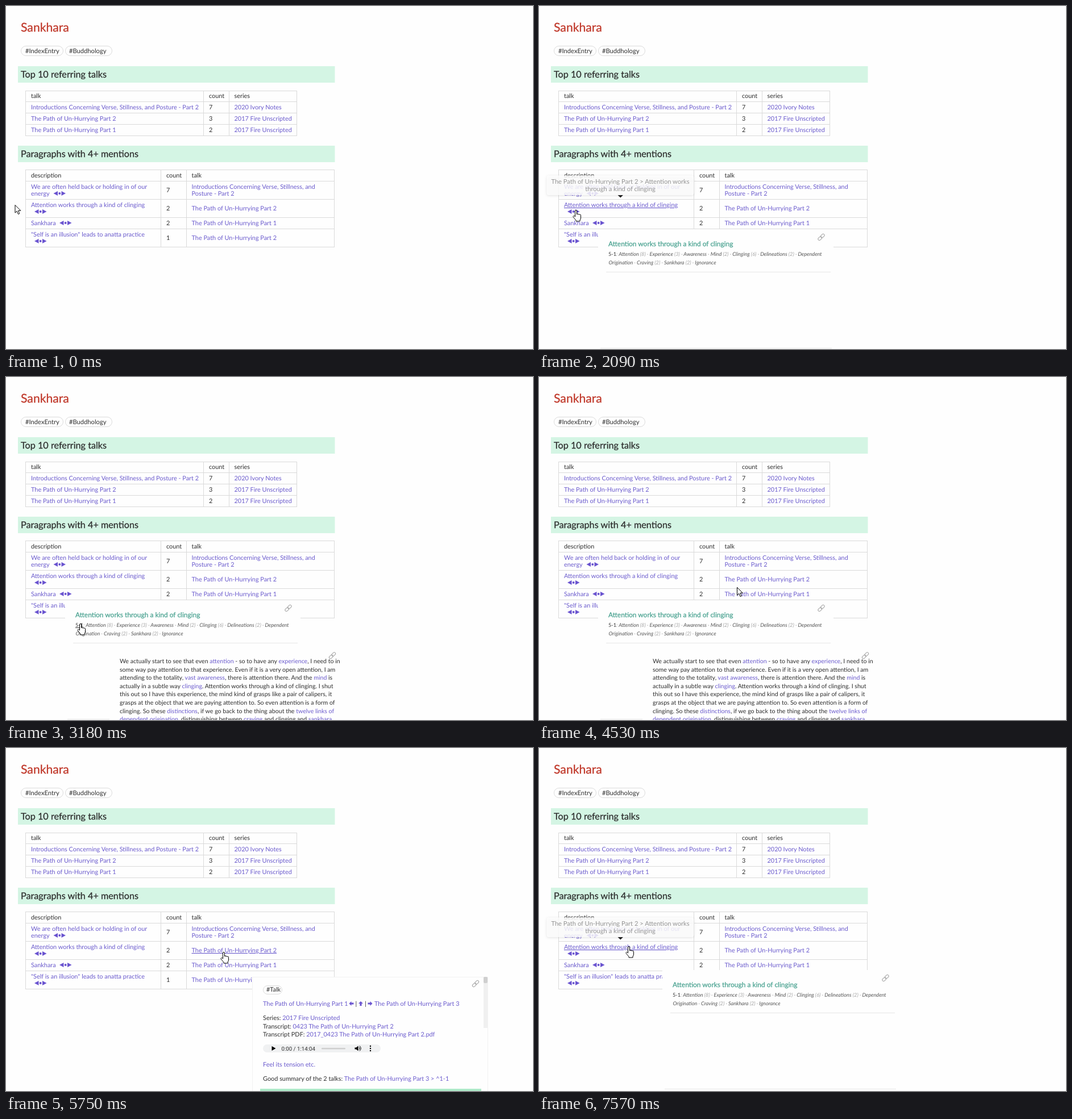
Recreate the animation shown at these times as an HTML page. Size 927 by 604 pixels, loop 8 s.

```html
<!DOCTYPE html>
<html lang="en">
<head>
<meta charset="utf-8">
<title>Sankhara</title>
<style>
html, body { margin: 0; width: 100%; height: 100%; overflow: hidden; background: #fefefe; }
svg { display: block; width: 927px; height: 604px; }
text { font-family: Lato, "Open Sans", sans-serif; font-size: 10.9px; fill: #2e2e2e; text-rendering: geometricPrecision; }
.link { fill: #6a5acd; }
.under { text-decoration: underline; }
.dim { fill: #a4a4a4; }
.title { font-size: 21.2px; fill: #c0392b; stroke: #c0392b; stroke-width: .3; }
.head { font-size: 16.2px; stroke: #2e2e2e; stroke-width: .25; }
.topic { font-size: 11.95px; fill: #46a08e; stroke: #46a08e; stroke-width: .25; }
.tag { font-size: 11.2px; }
.grid { fill: none; stroke: #dadada; }
.pill { fill: #fefefe; stroke: #dcdcdc; }
.mark { fill: #6a54d0; }
.rule { stroke: #e6e6e6; }
.chain { fill: none; stroke: #a6a6a6; }
.body text { font-size: 10.6px; }
.topics text { font-size: 9.17px; font-style: italic; fill: #555; }
.cursor { fill: #fff; stroke: #000; stroke-linejoin: round; }
</style>
</head>
<body>
<svg id="stage" viewBox="0 0 927 604"></svg>
<script>
const LOOP = 8000;
const path = n => `The Path of Un-Hurrying Part ${n}`;
const intro = ["Introductions Concerning Verse, Stillness, and", "Posture - Part 2"];
const series = "2017 Fire Unscripted";
const topic = "Attention works through a kind of clinging";

const text = (x, y, s, attrs = "") => `<text x="${x}" y="${y}" ${attrs}>${s}</text>`;
const link = (x, y, s, attrs = "") => text(x, y, s, `class="link" ${attrs}`);
const a = s => `<tspan class="link">${s}</tspan>`;
const rect = (x, y, w, h, attrs) => `<rect x="${x}" y="${y}" width="${w}" height="${h}" ${attrs}/>`;
const group = (id, s, attrs = "") => `<g id="${id}" ${attrs}>${s}</g>`;
const rule = (x1, x2, y) => `<path class="rule" d="M${x1} ${y}H${x2}"/>`;
const pill = (x, y, w, h) => rect(x + .5, y + .5, w, h, `rx="${h / 2}" class="pill"`);

// Table lines at the given columns and rows
function grid(xs, ys) {
  const [l, r, t, b] = [xs[0], xs.at(-1), ys[0], ys.at(-1)];
  const d = xs.map(x => `M${x + .5} ${t}V${b + 1}`).join("") + ys.map(y => `M${l} ${y + .5}H${r + 1}`).join("");
  return `<path class="grid" d="${d}"/>`;
}

// Back, dot and forward marks
const marks = (x, y) => `<path class="mark" d="M${x} ${y}l7.5-4v8zM${x + 21.5} ${y}l-7.5-4v8z"/>
  <circle class="mark" cx="${x + 10.7}" cy="${y}" r="2"/>`;

const chain = (x, y) => `<g class="chain" transform="translate(${x} ${y}) rotate(-45)">
  <rect x="-7" y="-2.3" width="7.6" height="4.6" rx="2.3"/><rect x="-.6" y="-2.3" width="7.6" height="4.6" rx="2.3"/></g>`;

const band = (y, s) => rect(21, y, 557.5, 29, 'fill="#d4f5e4"') + text(26, y + 20, s, 'class="head"');

function page() {
  return text(26, 44.5, "Sankhara", 'class="title"') +
    pill(26, 70, 74, 17) + text(34, 83, "#IndexEntry", 'class="tag"') +
    pill(104, 70, 82, 17) + text(111, 83, "#Buddhology", 'class="tag"') +
    band(106, "Top 10 referring talks") +
    grid([34, 347, 392, 511], [149, 168, 188, 208, 228]) +
    text(44, 162, "talk") + text(357, 162, "count") + text(401.5, 162, "series") +
    link(44, 182, intro.join(" ")) + text(357, 182, 7) + link(401.5, 182, "2020 Ivory Notes") +
    link(44, 202, path(2)) + text(357, 202, 3) + link(401.5, 202, series) +
    link(44, 222, path(1)) + text(357, 222, 2) + link(401.5, 222, series) +
    band(246, "Paragraphs with 4+ mentions") +
    grid([34, 272, 317, 577], [288, 308, 340, 372, 392, 424]) +
    text(44, 302, "description") + text(282, 302, "count") + text(326.5, 302, "talk") +
    link(44, 322, "We are often held back or holding in of our") + link(44, 334, "energy") + marks(83.5, 330) +
    text(282, 328, 7) + link(326.5, 322, intro[0]) + link(326.5, 334, intro[1]) +
    link(44, 354, topic, 'id="topicLink"') + marks(50, 362) + text(282, 360, 2) + link(326.5, 360, path(2), 'id="talkLink"') +
    link(44, 386, "Sankhara") + marks(94, 382) + text(282, 386, 2) + link(326.5, 386, path(1)) +
    link(44, 406, '"Self is an illusion" leads to anatta practice') + marks(50, 414) + text(282, 412, 1) + link(326.5, 412, path(2));
}

function topicPanel() {
  const n = k => `<tspan class="dim">(${k})</tspan>`;
  const dot = ' <tspan class="dim">·</tspan> ';
  const first = ["Attention " + n(8), "Experience " + n(3), "Awareness", "Mind " + n(2), "Clinging " + n(6), "Delineations " + n(2), "Dependent"];
  const second = ["Origination", "Craving " + n(2), "Sankhara " + n(2), "Ignorance"];
  const ref = '<tspan id="ref" style="font-style:normal;fill:#333">5-1</tspan><tspan class="dim">:</tspan> ';
  return rect(104, 393, 414, 211, 'fill="#fefefe"') + chain(496.5, 407) + rule(108, 515, 602.5) +
    group("topicText",
      text(122, 422.5, topic, 'class="topic"') + group("topicChain", chain(354, 415.5)) +
      group("topics", text(122, 440, ref + first.join(dot)) + text(122.5, 455, second.join(dot)), 'class="topics"') +
      rule(118, 513, 468.5));
}

function bodyPanel() {
  const lines = [
    `We actually start to see that even ${a("attention")} - so to have any ${a("experience")}, I need to in`,
    "some way pay attention to that experience. Even if it is a very open attention, I am",
    `attending to the totality, ${a("vast awareness")}, there is attention there. And the ${a("mind")} is`,
    `actually in a subtle way ${a("clinging")}. Attention works through a kind of clinging. I shut`,
    "this out so I have this experience, the mind kind of grasps like a pair of calipers, it",
    "grasps at the object that we are paying attention to. So even attention is a form of",
    `clinging. So these ${a("distinctions")}, if we go back to the thing about the ${a("twelve links of")}`,
    `${a("dependent origination")}, distinguishing between ${a("craving")} and clinging and ${a("sankhara")}`];
  return rect(182, 476, 420, 128, 'fill="#fefefe"') + chain(574, 490.5) +
    lines.map((s, i) => text(200, 504 + i * 14.6, s)).join("");
}

function player() {
  return rect(452, 522, 207, 14, 'rx="7" fill="#f0f1f2"') +
    '<path d="M467.5 525v8l7-4zM613.5 527.5h2.5l3.5-3v9l-3.5-3h-2.5z"/>' +
    '<path d="M621 526.5q2.2 2.5 0 5M622 524.5q4.5 4.5 0 9" fill="none" stroke="#000"/>' +
    rect(555, 528, 42, 2.4, 'rx="1.2" fill="#cfcfcf"') +
    [525, 529, 533].map(y => `<circle cx="641" cy="${y}" r="1.2"/>`).join("") +
    text(484.5, 532.5, "", 'id="clock" style="font-family:Roboto,sans-serif;font-size:9.7px"');
}

function talkPanel() {
  const arrow = (x, turn) => `<path class="mark" transform="translate(${x} 450) rotate(${turn})" d="M-4 0L0-4V-1.6H4V1.6H0V4z"/>`;
  return rect(433.5, 403.5, 414, 210, 'fill="#fefefe" stroke="#f2f2f2"') + chain(826, 415) +
    group("talkText",
      pill(452, 418, 33, 15) + text(458, 429, "#Talk") +
      link(452, 454, path(1)) + arrow(607.5, 0) + text(614.5, 454, "|") + arrow(624, 90) + text(631, 454, "|") +
      arrow(640.5, 180) + link(648, 454, path(3)) +
      text(452, 479, "Series: " + a(series)) +
      text(452, 494, "Transcript: " + a("0423 " + path(2))) +
      text(452, 508, "Transcript PDF: " + a(`2017_0423 ${path(2)}.pdf`)) + player() +
      link(452, 561, "Feel its tension etc.") +
      text(452, 586, "Good summary of the 2 talks: " + a(path(3) + " &gt; ^1-1")) +
      rect(447, 600, 389, 4, 'fill="#aeeac9"') +
      rect(840, 403, 7, 90, 'id="thumb"') + rect(840, 403, 7, 11, 'rx="2" fill="#cfcfcf"'));
}

function tooltip() {
  const style = 'text-anchor="middle" style="font-size:11.15px;fill:#949494"';
  return rect(13.5, 298.5, 259, 34.5, 'rx="4" fill="#fefefe" fill-opacity=".84" style="filter:drop-shadow(0 1px 2px #0002)"') +
    text(143, 313, path(2) + " &gt; Attention works", style) +
    text(143, 326, "through a kind of clinging", style) +
    '<path d="M138.5 333h9.5l-4.7 4.5z" fill="#222"/>';
}

const shapes = {
  arrow: '<path class="cursor" d="M.5.5V14.2L3.7 11.2L6 16.6L8.3 15.6L6 10.3H10.3Z"/>',
  hand: '<path class="cursor" d="M4.5 12V2a1.5 1.5 0 0 1 3 0V8a1.3 1.3 0 0 1 2.6.3a1.2 1.2 0 0 1 2.3.5a1.1 1.1 0 0 1 2.1.6V14q0 2-1.5 4v2H6v-1.6Q3.5 15.5 1.2 12.4a1.3 1.3 0 0 1 2-1.6z"/>',
  beam: '<path d="M0 .5H2.5L3.5 1.5L4.5.5H7M3.5 1.5V13M0 13.5H2.5L3.5 12.5L4.5 13.5H7" fill="none" stroke="#000"/>'
};

// Pointer stops: time, shape, left, top
const stops = [
  [0, "arrow", 15.5, 350], [380, "arrow", 18, 350], [540, "arrow", 37.5, 350], [690, "hand", 39, 351],
  [850, "hand", 46, 351], [970, "hand", 47, 351], [1120, "hand", 48, 351], [1810, "hand", 49, 351],
  [2090, "hand", 59, 359], [2240, "arrow", 85, 385], [2390, "arrow", 111, 406], [2540, "beam", 126, 420],
  [2660, "beam", 128, 429], [2780, "hand", 125, 433], [2930, "hand", 125, 434], [4260, "beam", 172, 422],
  [4380, "beam", 290, 411], [4530, "arrow", 348, 370], [4650, "hand", 375, 361], [4790, "hand", 376, 360],
  [4930, "hand", 377, 359], [6750, "hand", 362, 359], [6870, "hand", 331, 359], [7010, "arrow", 254, 358],
  [7130, "hand", 205, 350], [7290, "hand", 172, 349], [7430, "hand", 158, 349], [7570, "hand", 152, 349]];

const stage = document.getElementById("stage");
stage.innerHTML = page() + group("topicPanel", topicPanel()) + group("bodyPanel", bodyPanel(), 'class="body"') +
  group("talkPanel", talkPanel()) + group("tooltip", tooltip()) +
  group("pointer", Object.entries(shapes).map(([k, s]) => group(k, s)).join(""));

const el = id => document.getElementById(id);
const show = (id, on) => el(id).setAttribute("display", on ? "inline" : "none");
const underline = (id, on) => el(id).classList.toggle("under", on);
const move = (id, x, y) => el(id).setAttribute("transform", `translate(${x} ${y})`);

function draw(t) {
  const within = (from, to) => t >= from && t < to;
  const [, shape, x, y] = stops.findLast(s => s[0] <= t);
  for (const k in shapes) show(k, k === shape);
  move("pointer", x, y);

  underline("topicLink", within(850, 2240) || t >= 7130);
  underline("talkLink", within(4650, 7010));
  underline("ref", within(2780, 4260));

  show("tooltip", within(850, 2240) || t >= 7130);
  el("tooltip").setAttribute("opacity", within(850, 970) || within(7130, 7290) ? .4 : within(7290, 7430) ? .8 : 1);

  const again = t >= 7430;
  const hover = within(2540, 2780) || within(4260, 4530);
  show("topicPanel", within(1120, 4790) || again);
  move("topicPanel", again ? 113 : 0, again ? -2 : 0);
  show("topicText", !within(7430, 7570));
  move("topicText", 0, hover ? 2 : 0);
  show("topicChain", hover);
  show("bodyPanel", within(3180, 4650));

  show("talkPanel", within(4930, 7430));
  show("talkText", t >= 5220);
  el("clock").textContent = t < 5500 ? "0:00 / 0:00" : "0:00 / 1:14:04";
  el("thumb").setAttribute("fill", t < 5500 ? "#cfcfcf" : t < 5750 ? "#e0e0e0" : "#f0f0f0");
}

function tick(now) {
  draw(now % LOOP);
  requestAnimationFrame(tick);
}
draw(0);
requestAnimationFrame(tick);
</script>
</body>
</html>
```
